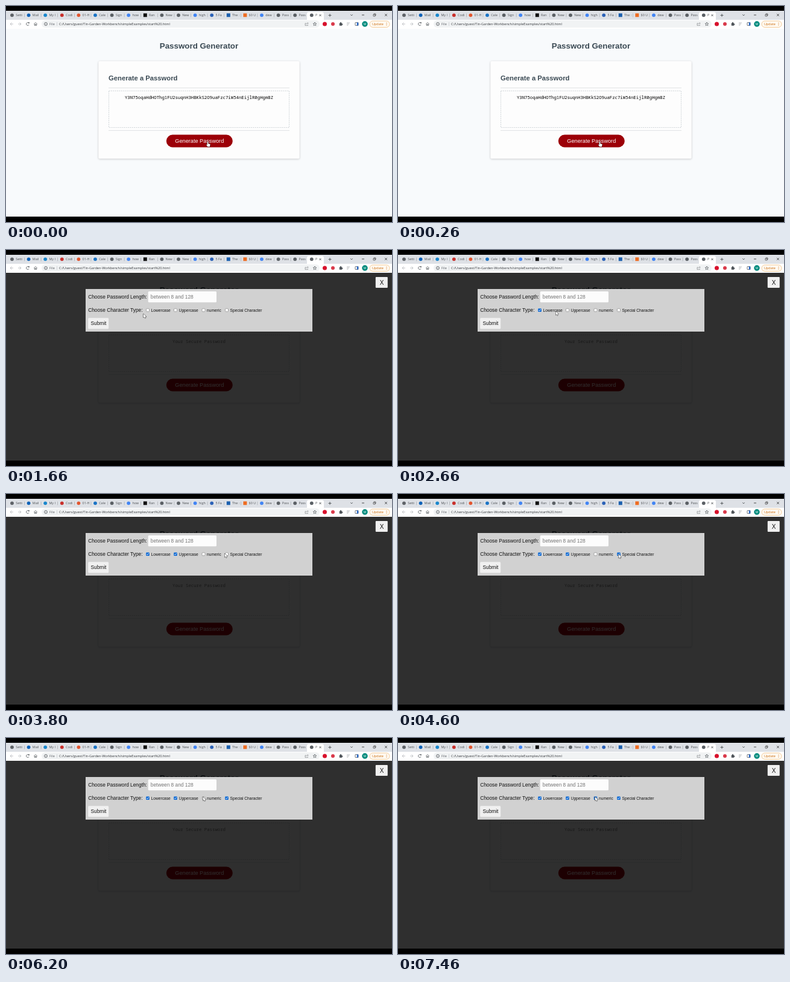
Write an HTML page with a canvas that moves like this. It is 640 by 360 pixels and loops after 8 s.

```html
<!DOCTYPE html>
<html lang="en">
<head>
<meta charset="utf-8">
<title>Password Generator</title>
<style>
  html, body { margin: 0; width: 100%; height: 100%; overflow: hidden; background: #000; }
  canvas { display: block; width: 640px; height: 360px; }
</style>
</head>
<body>
<canvas id="stage" width="640" height="360"></canvas>
<script>
const ctx = document.getElementById('stage').getContext('2d');
const LOOP = 8000;
const STEP = 200 / 3;
const PAGE_TOP = 38;
const PAGE_HEIGHT = 313;
const SANS = '"Liberation Sans", Arial, sans-serif';
const UI = '"Open Sans", "Noto Sans", sans-serif';
const MONO = '"Noto Sans Mono", "DejaVu Sans Mono", monospace';
const INK = '#3b4a54';
const ICON = '#50555a';

function rect(x, y, w, h, color, radius = 0) {
  ctx.fillStyle = color;
  ctx.beginPath();
  ctx.roundRect(x, y, w, h, radius);
  ctx.fill();
}

function frame(x, y, w, h, color, radius = 0, width = 0.8) {
  ctx.strokeStyle = color;
  ctx.lineWidth = width;
  ctx.beginPath();
  ctx.roundRect(x, y, w, h, radius);
  ctx.stroke();
}

function dot(x, y, r, color) {
  ctx.fillStyle = color;
  ctx.beginPath();
  ctx.arc(x, y, r, 0, Math.PI * 2);
  ctx.fill();
}

function ring(x, y, r, color, from = 0, to = Math.PI * 2) {
  ctx.strokeStyle = color;
  ctx.lineWidth = 0.8;
  ctx.beginPath();
  ctx.arc(x, y, r, from, to);
  ctx.stroke();
}

function text(str, x, y, font, color, align = 'left') {
  ctx.font = font;
  ctx.fillStyle = color;
  ctx.textAlign = align;
  ctx.fillText(str, x, y);
}

function stroke(x, y, path, color, width = 0.8) {
  ctx.save();
  ctx.translate(x, y);
  ctx.strokeStyle = color;
  ctx.lineWidth = width;
  ctx.stroke(new Path2D(path));
  ctx.restore();
}

const GLOBE = '#5b6065', SEARCH = '#4285f4';
const TABS = [
  ['Setti', '#5f6368'], ['Mail', '#0f62b8'], ['My I', '#1a87cc'], ['Codi', '#c9302c'],
  ['01-H', '#e2562f'], ['Cale', '#1b74c5'], ['Sign', GLOBE], ['how', SEARCH],
  ['Ran', '#111', true], ['New', GLOBE], ['New', GLOBE], ['high', SEARCH],
  ['5 Fa', '#2c62b8'], ['The :', '#1b5fae', true], ['$0 U', '#ee6c22', true], ['dew', SEARCH],
  ['Pass', GLOBE], ['Pass', GLOBE], ['P', GLOBE]
];

function drawTabs() {
  rect(0, 8, 640, 15, '#dee1e6');
  rect(499, 10, 28, 14, '#fff', [3, 3, 0, 0]);
  TABS.forEach(([label, color, square], i) => {
    const x = 10 + i * 27.6;
    if (square) rect(x - 3, 12.3, 6, 6, color);
    else dot(x, 15.3, 2.9, color);
    ctx.save();
    ctx.beginPath();
    ctx.rect(x + 5, 10, 13.5, 12);
    ctx.clip();
    text(label, x + 6.2, 17.4, `5.4px ${UI}`, '#4d5155');
    ctx.restore();
    if (i < 17) rect(x + 20.2, 12.5, 0.6, 6, '#9a9ea3');
  });
  stroke(521, 15.5, 'M-1.6-1.6L1.6 1.6M1.6-1.6L-1.6 1.6', '#3c4043');
  stroke(537, 15.5, 'M-2.5 0H2.5M0-2.5V2.5', '#3c4043');
  stroke(573, 15, 'M-1.8-.8L0 1L1.8-.8', '#3c4043');
  stroke(592, 15, 'M-2 0H2', '#222');
  stroke(611, 15, 'M-2-1H1V2H-2ZM-1-1V-2H2V1H1', '#222', 0.6);
  stroke(630, 15, 'M-2-2L2 2M2-2L-2 2', '#222', 0.7);
}

function drawToolbar() {
  rect(0, 23, 640, PAGE_TOP - 23, '#fff');
  rect(59, 24, 461, 12, '#f1f3f4', 6);
  stroke(9.5, 30, 'M2.5 0H-2.5M0-2.5L-2.5 0L0 2.5', '#b4b7ba');
  stroke(22.5, 30, 'M-2.5 0H2.5M0-2.5L2.5 0L0 2.5', '#b4b7ba');
  ring(36, 30, 2.4, ICON, 0.4, 5.5);
  rect(37, 27.3, 1.8, 1.8, ICON);
  stroke(49, 30, 'M-2.7 0L0-2.5L2.7 0M-1.8-.5V2.4H-.6V.6H.6V2.4H1.8V-.5', ICON, 0.7);
  ring(66, 30, 2.5, ICON);
  stroke(66, 30, 'M0-1.4V-.8M0-.2V1.4', ICON, 0.7);
  text('File', 72, 32.1, `5.6px ${UI}`, '#5f6368');
  rect(84, 27, 0.6, 6, '#b8bbbe');
  text('C:/Users/guest/Tin-Garden-Workbench/simpleExamples/start%20.html',
    88, 32.1, `5.6px ${UI}`, '#33363a');

  stroke(498.5, 30, 'M-1-1.2H-2.5V2.5H2V1M-1 .8C-.8-.8 0-1.2 2.5-1.2M1.2-2.7L2.7-1.2L1.2.3', '#777b7f', 0.6);
  stroke(512, 30, 'M0-2.9L.8-.9L2.9-.8L1.3.6L1.8 2.6L0 1.5L-1.8 2.6L-1.3.6L-2.9-.8L-.8-.9Z', ICON, 0.7);
  dot(528.5, 30, 3.5, '#d8122c');
  dot(542, 30, 3, '#d93a4b');
  rect(552.8, 28.6, 4.4, 4.2, ICON, 0.6);
  dot(555, 28.3, 1.2, ICON);
  dot(557.4, 30.6, 1.1, ICON);
  stroke(568, 30, 'M-3-2H2M-3 0H1M-3 2H-.5', '#aaadb0');
  frame(579, 27.5, 5, 5, ICON, 0.5);
  rect(581.8, 27.5, 2.4, 5, '#2868c7');
  dot(595, 30, 4.7, '#00897b');
  text('M', 595, 31.9, `5px ${UI}`, '#fff', 'center');
  rect(603, 25, 33, 10.5, '#fffaf2', 5.2);
  frame(603, 25, 33, 10.5, '#efb56d', 5.2, 0.7);
  text('Update', 607, 32, `5.5px ${UI}`, '#c96a0c');
  for (let y = 28; y <= 32; y += 2) dot(631, y, 0.55, '#c96a0c');
}

function drawPage(hasPassword) {
  rect(0, PAGE_TOP, 640, PAGE_HEIGHT, '#f8fafc');
  text('Password Generator', 320, 71.2, `bold 13.33px ${SANS}`, INK, 'center');

  ctx.save();
  ctx.shadowColor = 'rgba(0,0,0,.22)';
  ctx.shadowBlur = 3.3;
  ctx.shadowOffsetY = 0.8;
  rect(153.3, 92, 333.4, 162.5, '#fdfdfd', 2);
  ctx.restore();

  text('Generate a Password', 170, 124, `bold 11.25px ${SANS}`, INK);
  rect(170, 136, 300, 0.8, '#d8dbde');
  rect(170, 207, 300, 0.8, '#d8dbde');
  ctx.setLineDash([2, 1.4]);
  frame(170.5, 141.5, 299, 61, '#c3c9ce');
  ctx.setLineDash([]);

  const [content, color] = hasPassword
    ? ['Y3N75oqaHdHOThg1FU2suqnH3HBKkS2O9uaFzc7iW54nEijlR0gHgmBZ', '#000']
    : ['Your Secure Password', '#757575'];
  text(content, 320, 155.4, `500 7.33px ${MONO}`, color, 'center');

  rect(265.8, 214.6, 110, 20.8, '#9c0008', 10.4);
  text('Generate Password', 320.8, 228.2, `9.17px ${SANS}`, '#fff', 'center');
}

const OPTIONS = [
  { label: 'Lowercase', x: 235, checkedAt: 2200 },
  { label: 'Uppercase', x: 281, checkedAt: 3130 },
  { label: 'numeric', x: 327.5, checkedAt: 6330 },
  { label: 'Special Character', x: 366, checkedAt: 4400 }
];

function drawCheckbox(x, y, checked) {
  if (checked) {
    rect(x - 2.8, y - 2.8, 5.6, 5.6, '#0b68d4', 1);
    stroke(x, y, 'M-1.7 0L-.5 1.3L1.8-1.4', '#fff', 0.9);
  } else {
    rect(x - 2.7, y - 2.7, 5.4, 5.4, '#fff', 1);
    frame(x - 2.5, y - 2.5, 5, 5, '#707070', 0.9, 0.6);
  }
}

function drawDialog(t) {
  rect(0, PAGE_TOP, 640, PAGE_HEIGHT, 'rgba(0,0,0,.81)');
  const body = `8.33px ${SANS}`;
  rect(612.8, 45, 20, 18, '#f0f0f0', 1);
  text('X', 623.1, 57.6, `10px ${SANS}`, '#111', 'center');

  rect(132, 65, 376, 71, '#d1d1d1');
  text('Choose Password Length:', 136.2, 81, body, '#111');
  rect(235.7, 69, 113.3, 18.3, '#fcfcfc', 1.5);
  text('between 8 and 128', 239.8, 81, body, '#757575');
  text('Choose Character Type:', 136.2, 103.2, body, '#111');
  for (const { label, x, checkedAt } of OPTIONS) {
    drawCheckbox(x, 100.2, t >= checkedAt);
    text(label, x + 5.6, 102.8, `6.67px ${SANS}`, '#111');
  }
  rect(136.2, 113.2, 34, 18.2, '#f0f0f0', 1.5);
  text('Submit', 153.4, 125.3, body, '#111', 'center');
}

// Pointer path: time, x, y
const PATH = [
  [0, 333.5, 226], [860, 333.5, 226], [1660, 228, 106.5], [1740, 228, 106.5],
  [2130, 234, 100], [2270, 234, 100], [2530, 261.5, 102], [2660, 261.5, 102],
  [3060, 281, 100], [3330, 281, 100], [3800, 362.5, 99], [4060, 365.5, 100],
  [5530, 366, 101], [5800, 345, 105], [6200, 326.8, 98]
];

function pointerAt(t) {
  const i = PATH.findIndex(key => key[0] > t);
  if (i < 0) return PATH[PATH.length - 1].slice(1);
  const [t0, x0, y0] = PATH[i - 1], [t1, x1, y1] = PATH[i];
  const p = (t - t0) / (t1 - t0), e = p * p * (3 - 2 * p);
  return [x0 + (x1 - x0) * e, y0 + (y1 - y0) * e];
}

const ARROW = new Path2D('M0 0V6.4L1.5 5.1L2.5 7.3L3.6 6.8L2.6 4.7H4.6Z');
const HAND = new Path2D('M.2.6Q1-.4 1.8.6V3.4L4.6 4Q5.2 4.3 5 5.2L4.4 8.6H.8L-1.4 5.6Q-1.2 4.6.2 5.4Z');

function drawPointer(t, hand) {
  if (t >= 5390 && t < 5530) return;
  ctx.save();
  ctx.translate(...pointerAt(t));
  ctx.lineWidth = 0.9;
  ctx.strokeStyle = '#111';
  ctx.fillStyle = '#fff';
  const shape = hand ? HAND : ARROW;
  ctx.stroke(shape);
  ctx.fill(shape);
  ctx.restore();
}

function draw(now) {
  const t = Math.floor((now % LOOP + 8) / STEP) * STEP;
  const open = t >= 395;
  rect(0, 0, 640, 360, '#000');
  drawPage(!open);
  drawTabs();
  drawToolbar();
  if (open) drawDialog(t);
  drawPointer(t, !open);
  requestAnimationFrame(draw);
}
requestAnimationFrame(draw);
</script>
</body>
</html>
```
